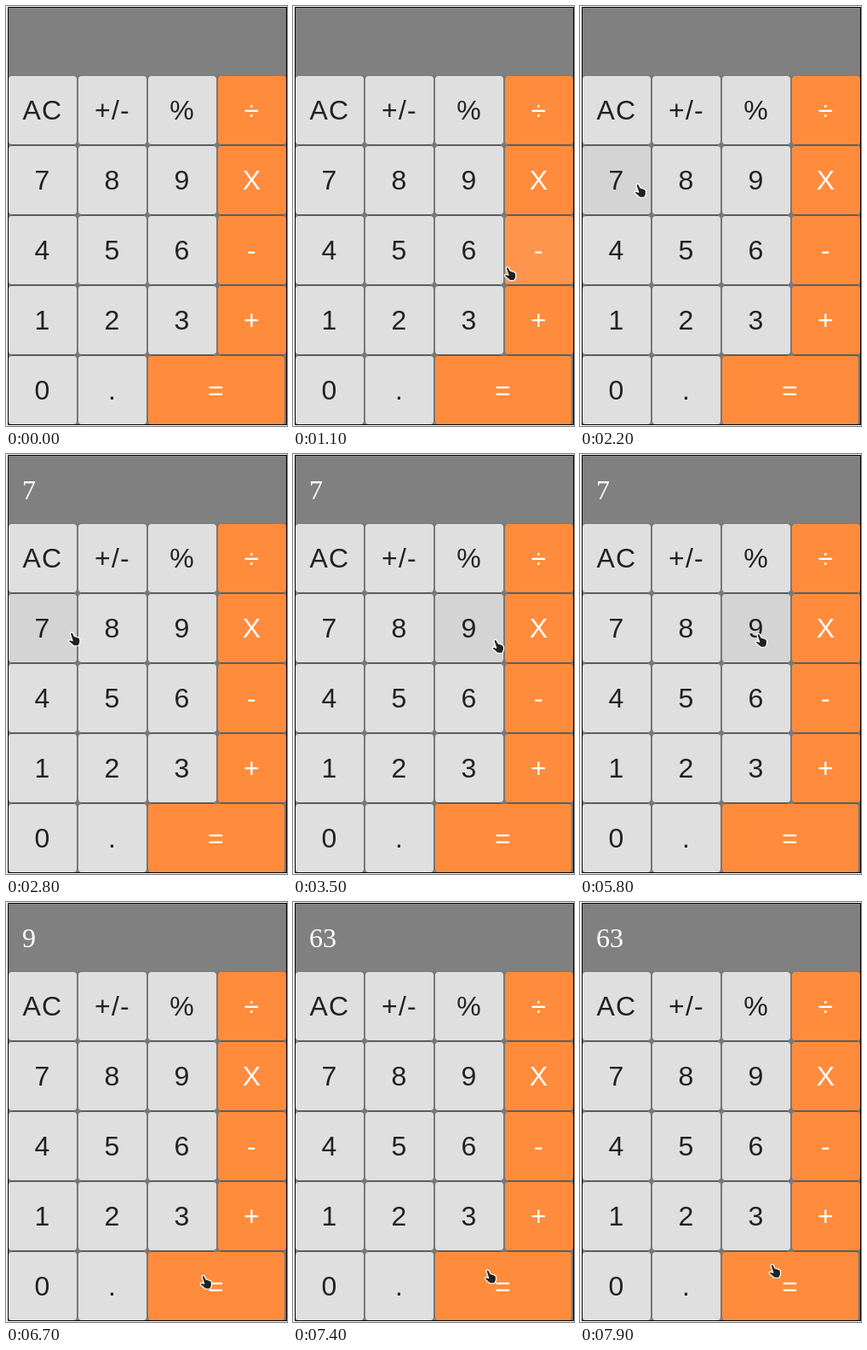
Animation, 330 px wide and 492 px high, one loop 8000 ms. Source, as an HTML page:

```html
<!DOCTYPE html>
<html lang="en">
<head>
<meta charset="utf-8">
<title>Calculator</title>
<style>
html, body { margin: 0; width: 100%; height: 100%; overflow: hidden; background: #fff; }
svg { display: block; }
.label { font: 32px "Liberation Sans", Arial, sans-serif; letter-spacing: 1.2px; text-anchor: middle; }
#display { font: 32px "Liberation Serif", "Times New Roman", serif; fill: #fff; }
</style>
</head>
<body>
<svg width="330" height="492" viewBox="0 0 330 492">
  <rect x="2" y="1" width="328" height="490" fill="#777"/>
  <rect x="3" y="2" width="326" height="79.5" fill="#808080"/>
  <text id="display" x="19" y="53"></text>
  <g id="keys"></g>
  <rect x="2.5" y="1.5" width="327" height="489" fill="none" stroke="#000"/>
  <g id="cursor">
    <path d="M3.2 2.2 Q4.8 .6 6.2 2.4 L8 6 L12.6 7.4 Q14.6 8.2 14.6 10.5 L14.4 14 L12.6 17.2 L7.4 17.4 L1.6 12.6 Q.6 11 2.2 10.2 L5.6 11 L3.2 4 Z"
      fill="#222" stroke="#fff" stroke-width="1.3" stroke-linejoin="round"/>
  </g>
</svg>
<script>
const LOOP = 8000, STEP = 100;
const NS = "http://www.w3.org/2000/svg";
const display = document.getElementById("display");
const cursor = document.getElementById("cursor");
const keyLayer = document.getElementById("keys");

// time, x, y of the pointer's top-left corner
const path = [
  [600, 332, 446], [1000, 262, 312], [1600, 63, 207], [2700, 63, 207],
  [3400, 233, 216], [4200, 233, 216], [4500, 273, 216], [4800, 273, 216],
  [5200, 205, 209], [6100, 205, 209], [6600, 227, 436], [7200, 227, 436],
  [7600, 221, 423], [LOOP, 221, 423]
];
const readings = [[0, ""], [2500, "7"], [6000, "9"], [7200, "63"]];

function add(parent, tag, attrs) {
  const el = document.createElementNS(NS, tag);
  for (const name in attrs) el.setAttribute(name, attrs[name]);
  return parent.appendChild(el);
}

function makeKey(text, col, row) {
  const x = 3 + col * 82, y = 82 + row * 82;
  const w = text === "=" ? 160 : 80;
  const orange = col === 3 || text === "=";
  if (row < 4) add(keyLayer, "rect", { x: x + 3, y: y + 80, width: w - 6, height: 2, fill: "#5c5c5c" });
  const face = add(keyLayer, "rect", { x, y, width: w, height: 80, rx: 4 });
  const label = add(keyLayer, "text", {
    class: "label", x: x + w / 2, y: y + 51, fill: orange ? "#fff" : "#212121"
  });
  label.textContent = text;
  return { text, x, y, w, face, orange };
}

const rows = [["AC", "+/-", "%", "÷"], ["7", "8", "9", "X"], ["4", "5", "6", "-"],
  ["1", "2", "3", "+"], ["0", ".", "="]];
const keys = rows.flatMap((row, r) => row.map((text, c) => makeKey(text, c, r)));

function pointerAt(t) {
  if (t < path[0][0]) return null;
  const i = path.findIndex(p => p[0] > t);
  const [t0, x0, y0] = path[i - 1], [t1, x1, y1] = path[i];
  const u = (t - t0) / (t1 - t0), e = u * u * (3 - 2 * u);
  return [x0 + (x1 - x0) * e, y0 + (y1 - y0) * e];
}

function keyColor(key, hover) {
  if (key.text === "=") return "#ff8c3c";
  if (key.orange) return hover ? "#ff944c" : "#ff8c3c";
  return hover ? "#d5d4d5" : "#dfdfdf";
}

function draw(t) {
  const pos = pointerAt(t);
  cursor.setAttribute("visibility", pos ? "visible" : "hidden");
  if (pos) cursor.setAttribute("transform", `translate(${pos[0]} ${pos[1]})`);
  for (const key of keys) {
    const dx = pos ? pos[0] + 4 - key.x : -1;
    const dy = pos ? pos[1] + 2 - key.y : -1;
    const hover = dx >= 0 && dx < key.w && dy >= 0 && dy < 80;
    key.face.setAttribute("fill", keyColor(key, hover));
  }
  display.textContent = readings.filter(r => r[0] <= t).pop()[1];
}

const start = performance.now();
function frame() {
  const t = (performance.now() - start) % LOOP;
  draw(Math.floor(t / STEP) * STEP);
  requestAnimationFrame(frame);
}
draw(0);
requestAnimationFrame(frame);
</script>
</body>
</html>
```
